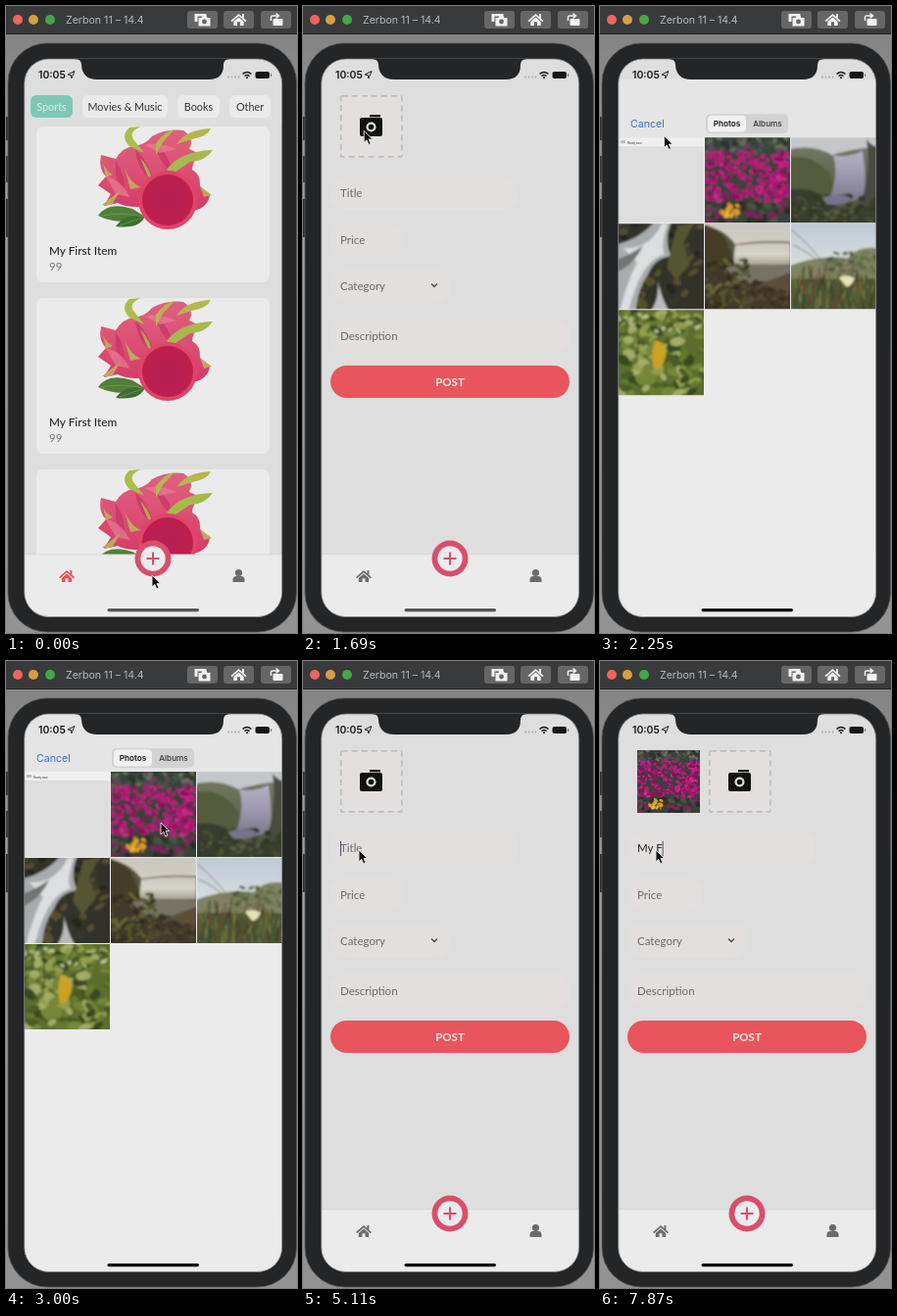
An HTML page that plays this animation: 297 by 640 pixels, repeating every 8000 ms.

```html
<!DOCTYPE html>
<html lang="en">
<head>
<meta charset="utf-8">
<title>Listing app demo</title>
<style>
  html, body { margin: 0; width: 100%; height: 100%; overflow: hidden; background: #999; }
  svg { display: block; }
  #stage { width: 100vw; height: 100vh; }
  text { font: 11.5px Lato, "Open Sans", sans-serif; white-space: pre; }
  .ui { font-family: Inter, Roboto, sans-serif; }
</style>
</head>
<body>
<svg id="stage" viewBox="0 0 297 640" preserveAspectRatio="none"></svg>
<script>
const LOOP = 8000;
const RED = '#e8555c', PANEL = '#ebebeb', GREY = '#6c6a6a';
const T = { form: 330, open: 1930, close: 3300, picked: 5480 };
const KEYS = [[7090, 'M'], [7310, 'My'], [7520, 'My '], [7740, 'My F']];
const POINTER = [
  [0, 149, 581], [500, 149, 581], [1620, 62, 127], [2000, 64, 132],
  [2200, 64, 132], [2900, 158, 165], [3330, 158, 165], [3470, 158, 166],
  [4160, 158, 166], [4980, 57, 193]
];

let seed = 7;
const rand = (a = 0, b = 1) => {
  seed = (seed * 16807) % 2147483647;
  return a + (b - a) * seed / 2147483647;
};
const rect = (x, y, w, h, fill, r = 0, extra = '') =>
  `<rect x="${x}" y="${y}" width="${w}" height="${h}" rx="${r}" fill="${fill}" ${extra}/>`;
const path = (d, fill, extra = '') => `<path d="${d}" fill="${fill}" ${extra}/>`;
const line = (d, color, width = 1, extra = '') =>
  path(d, 'none', `stroke="${color}" stroke-width="${width}" ${extra}`);
const circle = (x, y, r, fill, extra = '') =>
  `<circle cx="${x}" cy="${y}" r="${r}" fill="${fill}" ${extra}/>`;
const text = (x, y, s, fill, extra = '') => `<text x="${x}" y="${y}" fill="${fill}" ${extra}>${s}</text>`;
const at = (x, y, s, extra = '') => `<g transform="translate(${x} ${y})" ${extra}>${s}</g>`;
const gradient = (id, ...colors) =>
  `<linearGradient id="${id}" x2="0" y2="1">${colors.map((c, i) =>
    `<stop offset="${i / (colors.length - 1)}" stop-color="${c}"/>`).join('')}</linearGradient>`;

// Scatter small tilted ellipses over a region
function blobs(n, [x0, y0, x1, y1], size, colors) {
  let out = '';
  for (let i = 0; i < n; i++) {
    const x = rand(x0, x1), y = rand(y0, y1), r = rand(size * .5, size);
    const color = colors[Math.floor(rand(0, colors.length))];
    out += `<ellipse rx="${r.toFixed(1)}" ry="${(r * rand(.35, .8)).toFixed(1)}" fill="${color}" ` +
      `transform="translate(${x.toFixed(1)} ${y.toFixed(1)}) rotate(${rand(-60, 60).toFixed(0)})"/>`;
  }
  return out;
}

// Soft-focus scene on a backdrop that overscans the crop
const scene = (backdrop, ...parts) =>
  `<g filter="url(#soft)">${rect(-9, -9, 105, 105, backdrop)}${parts.join('')}</g>`;

const photos = [
  rect(0, 0, 87, 87, '#dedede') + rect(0, 0, 87, 9, '#f0f0f0') +
    rect(2, 3, 5, 3, '#bbb') + text(9, 6.5, 'Ready now', '#333', 'style="font-size:3px"'),

  scene('#37423a',
    blobs(45, [0, 0, 87, 16], 5, ['#455641', '#2b362e', '#64705a', '#69405f']),
    blobs(280, [-2, 15, 90, 66], 4, ['#c2187f', '#a51270', '#d0278c', '#7f1759', '#b41b78']),
    blobs(70, [0, 66, 87, 88], 5, ['#2c3728', '#48543f', '#7d235c', '#252d23']),
    blobs(16, [15, 69, 34, 82], 4, ['#dca023', '#ecb62e', '#cf8726'])),

  scene('#c4c6ca',
    path('M-5 13Q22 6 42 18Q60 12 92 9V95H-5Z', 'url(#hill)'),
    path('M43 18Q58 21 73 14Q77 39 75 60Q60 70 40 61Q49 37 43 18', 'url(#falls)'),
    path('M77 2Q85 12 92 8V92H65L75 53Q81 27 77 2', '#4a4c40'),
    path('M-5 22Q18 15 36 33Q46 40 39 62L-5 68Z', '#535c3e'),
    path('M-5 54Q22 48 41 66T92 56V95H-5Z', '#393d2d'),
    blobs(60, [0, 60, 87, 87], 4, ['#484e32', '#30372a', '#595c3d']),
    path('M32 62Q48 54 63 63Q51 71 37 68Z', '#77738a')),

  scene('#33332b',
    blobs(70, [0, 0, 87, 87], 7, ['#24251f', '#403f2c', '#56502f', '#323729']),
    path('M-5 22Q23 16 39-5H55Q45 18 54 33Q36 35 30 52Q19 66 17 95H-5Z', '#a9acae'),
    path('M5 25Q32 26 44 0H50Q42 24 47 31Q22 38 10 90H1Q10 55 19 40Z', '#dcdedf'),
    path('M25 22Q16 43-5 51V38Q14 31 25 22', '#727572'),
    path('M60 2L76 0L66 20L73 41L59 58L49 44Z', '#575430'),
    path('M40 58Q42 78 31 92H53Q43 75 40 58', '#b9babb')),

  scene('url(#evening)',
    path('M-5 2Q18 3 31 21Q60 16 92 19V95H-5Z', '#5c5443'),
    path('M31 22Q58 18 87 20V42H29Z', 'url(#falls5)'),
    path('M-5 0Q20 4 26 27L32 46L-5 61Z', '#443d27'),
    path('M20 45Q52 39 92 44V62Q52 58 28 64Z', '#767365'),
    path('M-5 56L19 43L38 62L92 57V95H-5Z', '#40382a'),
    blobs(90, [0, 36, 46, 86], 4, ['#535829', '#302c20', '#686634', '#443e27']),
    blobs(50, [38, 60, 87, 87], 5, ['#373025', '#544a35', '#453d29']),
    path('M55 62L92 48V70Z', '#5b4d39')),

  scene('url(#sky)',
    path('M-5 44Q30 31 58 35Q70 21 92 26V95H-5Z', '#7f8263'),
    blobs(44, [36, 30, 87, 49], 4, ['#616c48', '#757b56', '#505b3c']),
    rect(-5, 56, 97, 40, '#4b5435'),
    [...Array(120)].map(() => line(`M${rand(0, 87)} ${rand(56, 92)}l${rand(-4, 4)} ${-rand(6, 18)}`,
      ['#354325', '#65703a', '#6b4931', '#777e43'][Math.floor(rand(0, 4))], 1.3)).join(''),
    line('M0 6Q22 24 34 43M2 22Q18 29 28 39', '#6b7169', .9),
    path('M49 55Q57 51 65 56Q61 65 56 64Z', '#e5e1b8')),

  scene('#5d6d2d',
    blobs(160, [0, 0, 87, 87], 8, ['#758738', '#485d28', '#919f4b', '#374a22', '#a4ac68', '#66792f']),
    line('M18 0Q22 34 18 50M51 2L37 35', '#38412a', 1.2),
    path('M37 31Q49 32 48 48Q45 60 36 61Q32 45 37 31', '#cba225'),
    blobs(14, [0, 0, 87, 22], 4, ['#bdc59a', '#a8b578']))
];
const photo = (i, x, y, size) =>
  `<svg x="${x}" y="${y}" width="${size}" height="${size}" viewBox="0 0 87 87">${photos[i]}</svg>`;

const house = path('M0-6L8 1L6.8 2.2L0-3.7L-6.8 2.2L-8 1ZM3.5-6H5.4V-1L3.5-2.8ZM-5.2 2L0-2.5L5.2 2V6H1.5V2.2H-1.5V6H-5.2Z', 'currentColor');

const fruit =
  path('M97 29L112 33Q119 21 131 20Q143 18 149 10Q164 2 181 4Q193 12 187 23L198 28Q190 36 190 44Q199 49 198 61L208 70Q206 83 191 86L133 82Q121 82 114 78L100 81L107 69L94 60L102 51Q94 43 97 29', 'url(#peel)') +
  path('M112 35Q122 49 121 67Q110 59 112 35M132 23Q147 38 151 56Q135 48 132 23M153 18Q168 31 169 45Q156 38 153 18', '#cc3d67') +
  path('M102 51Q119 55 126 72L112 69ZM142 19Q155 15 174 23L157 27Z', '#e98298', 'opacity=".65"') +
  path('M126 20Q116 10 126 1L138 0Q125 5 130 13L141 27Z', '#aabd4c') +
  path('M153 17Q163 4 172 3L160 16L153 29ZM174 18Q184 3 209 2Q206 10 190 13Z', '#b4b64e') +
  path('M164 44Q178 25 211 24Q203 36 188 36L170 48Z', '#a7b84c') +
  path('M97 29Q98 43 109 49L102 52ZM120 39Q125 57 138 62L127 64ZM98 80L117 65L108 80ZM198 61L210 70L202 72Z', '#bfa75c') +
  path('M137 32Q148 43 151 61L144 49Z', '#b5a554') +
  path('M94 91Q104 76 129 84L142 92Q116 102 94 91', '#4f8038') +
  path('M112 102Q121 89 142 91Q137 105 112 102', '#3d6d31') +
  line('M97 91Q119 87 140 92M116 101L139 93', '#7a9d50', .7) +
  circle(165, 75, 30, '#e2436a') + circle(165, 75, 26, 'url(#flesh)');

const card = y => at(0, y,
  rect(31, 0, 238, 159, PANEL, 7) + fruit +
  text(44, 131, 'My First Item', '#272727', 'style="font-size:11.8px;font-weight:500"') +
  text(44, 147, '99', '#777'));

const chip = (x, w, label, fill = PANEL, color = '#333') =>
  rect(x, 91, w, 23, fill, 6) +
  text(x + w / 2, 106.5, label, color, 'text-anchor="middle" style="font-size:10.8px"');

const field = (y, w, label, id = '') =>
  rect(28, y, w, 34, '#e3dfde', 16) + text(38, y + 21, label, GREY, id);

const picker = x => at(x, 91,
  rect(.8, .8, 62, 62, '#e3dfde', 1, 'stroke="#bdbdbd" stroke-width="1.7" stroke-dasharray="6 4"') +
  path('M20 25Q20 23 22 23H30V20H41V23Q43 23 43 25V40Q43 42 41 42H22Q20 42 20 40Z', '#101210') +
  line('M30 22.6H42', '#d5d1d0', .8) + circle(31.5, 32.5, 5, '#e3dfde') + circle(31.5, 32.5, 2.8, '#101210'));

const barButton = (x, icon) => rect(x, 5, 31, 18, '#666667', 3) + at(x + 15.5, 14, icon, 'color="#f1f1f1"');

const windowBar =
  rect(0, 0, 297, 29, '#393a3b') + rect(0, 28, 297, 1, '#222') +
  circle(12, 14, 5, '#ed655d') + circle(28, 14, 5, '#d5a044') + circle(45, 14, 5, '#43a747') +
  text(61, 18, 'Zerbon 11 – 14.4', '#b9b9ba', 'class="ui" style="font-size:10.6px"') +
  barButton(185, path('M-8-6H4V-3.5H-5V2H-8Z', 'currentColor') +
    path('M-4-2H-1L0-4H4L5-2H8V6.5H-4Z', 'currentColor') + circle(2, 2, 2.4, '#666667')) +
  barButton(222, house) +
  barButton(260, rect(-3, -1, 10, 7, 'currentColor', 1) +
    line('M-5 1V-3Q-5-4 -3-4H2M0-6.5L3-4L0-1.5', 'currentColor', 1.5));

const feed = card(123) + card(298) + card(473) +
  rect(19, 54, 263, 69, '#dedede') +
  chip(25, 43, 'Sports', '#7ec7b5', '#d9eee8') + chip(78, 87, 'Movies &amp; Music') +
  chip(175, 43, 'Books') + chip(228, 42, 'Other');

const form =
  `<g id="chosen">${photo(1, 38, 91, 64)}</g><g id="picker">${picker(38)}</g>` +
  field(174, 191, 'Title', 'id="title"') + field(222, 76, 'Price') +
  field(269, 123, 'Category') + line('M131 283.5L134 286.5L137 283.5', '#444', 1.3) +
  field(320, 245, 'Description') +
  rect(28, 367, 244, 33, RED, 16.5) +
  text(150, 388, 'POST', '#f4e6e6', 'text-anchor="middle" style="font-weight:700"') +
  rect(0, 184, 1, 15, '#465079', 0, 'id="caret"');

const tabs = rect(19, 560, 263, 64, PANEL) + rect(19, 559.5, 263, .7, '#d2d2d2') +
  at(62, 582, house, 'id="home"') +
  circle(237.5, 578.5, 3.6, GREY) + path('M231.5 588V585Q232 582 235 582H240Q243 582 243.5 585V588Z', GREY) +
  circle(150, 564, 18.5, '#d94e6a') + circle(150, 564, 12.7, PANEL) +
  line('M143.5 564H156.5M150 557.5V570.5', '#d94e6a', 2);

const sheet = rect(19, 54, 263, 640, PANEL) + rect(19, 54, 263, 59, '#e5e5e5') +
  text(31, 103, 'Cancel', '#3674c4', 'class="ui" style="font-size:10.6px"') +
  rect(108, 89, 84, 20, '#d2d2d3', 5) + rect(110, 90.5, 39, 17, '#f1f1f1', 4) +
  text(129.5, 102, 'Photos', '#171717', 'class="ui" text-anchor="middle" style="font-size:8.2px;font-weight:600"') +
  text(171, 102, 'Albums', '#333', 'class="ui" text-anchor="middle" style="font-size:8.2px;font-weight:500"') +
  photos.map((_, i) => photo(i, 19 + 88 * (i % 3), 113 + 88 * Math.floor(i / 3), 87)).join('');

const status =
  path('M70 54Q77 54 77 60Q78 75 93 75H207Q222 75 222 60Q222 54 229 54Z', '#242526') +
  text(33, 74, '10:05', '#161616', 'class="ui" style="font-size:10.4px;font-weight:600"') +
  path('M70 66.5L66.8 74L66.3 70.6L63 70Z', 'none', 'stroke="#222" stroke-width="1"') +
  [227, 230.5, 234, 237.5].map(x => circle(x, 72.5, .9, '#aaa')).join('') +
  line('M241.5 69.5Q246 65.5 250.5 69.5M243.5 71.6Q246 69.5 248.5 71.6', '#161616', 1.5) + circle(246, 73.2, 1, '#161616') +
  rect(254.5, 67, 14.5, 7, '#161616', 2) + rect(270, 69, 1.2, 3, '#777', .6);

const stage = document.getElementById('stage');
stage.innerHTML = `
  <defs>
    <clipPath id="screen">${rect(18.7, 54, 263, 569.5, '#000', 25)}</clipPath>
    <filter id="soft"><feGaussianBlur stdDeviation=".9"/></filter>
    <radialGradient id="flesh"><stop stop-color="#b51f53"/><stop offset="1" stop-color="#bd1f4e"/></radialGradient>
    ${gradient('desk', '#848484', '#a2a2a2', '#999', '#929292')}
    ${gradient('peel', '#e0607f', '#dc5075', '#d23c68')}
    ${gradient('hill', '#747860', '#596149', '#414733')}
    ${gradient('falls', '#b5b2c3', '#9c97ad', '#7b778c')}
    ${gradient('falls5', '#c9c6bc', '#d9d6cc', '#a6a294')}
    ${gradient('evening', '#c5c5c3', '#ddd3bd', '#81765f')}
    ${gradient('sky', '#b9c6d4', '#d8dddf', '#b8b8a8')}
  </defs>
  ${rect(0, 29, 297, 611, 'url(#desk)')}
  ${rect(0, 113, 4, 24, '#333') + rect(0, 153, 4, 27, '#383838') + rect(0, 197, 4, 39, '#303030')}
  ${windowBar}
  ${rect(2, 38, 294.5, 601, '#242526', 40, 'stroke="#555" stroke-width=".8"')}
  <g clip-path="url(#screen)">
    ${rect(18, 54, 264, 570, '#dedede')}
    <g id="feed">${feed}</g><g id="form">${form}</g>
    ${tabs}<g id="sheet">${sheet}</g>
  </g>
  ${rect(18.7, 54, 263, 569.5, 'none', 25, 'stroke="#777" stroke-width=".8"')}
  ${status}
  ${rect(103.5, 615, 93.5, 3.2, '#111', 1.6, 'id="indicator"')}
  <g id="pointer">${path('M0 0V12L2.8 9.4L4.8 14L7 13L5 8.6H8.8Z', '#111', 'stroke="#e8e8e8" stroke-width=".9"')}</g>`;

const el = Object.fromEntries([...stage.querySelectorAll('[id]')].map(n => [n.id, n]));
const show = (node, on) => node.setAttribute('visibility', on ? 'visible' : 'hidden');
const move = (node, x, y) => node.setAttribute('transform', `translate(${x} ${y})`);

// Critically damped spring from 0 to 1
const settle = (ms, rate) => {
  const s = Math.max(0, ms) * rate / 1000;
  return 1 - (1 + s) * Math.exp(-s);
};

function pointerAt(t) {
  const next = POINTER.findIndex(p => p[0] > t);
  if (next < 0) return POINTER[POINTER.length - 1].slice(1);
  const [t0, x0, y0] = POINTER[next - 1], [t1, x1, y1] = POINTER[next];
  const u = (t - t0) / (t1 - t0), e = u * u * (3 - 2 * u);
  return [x0 + (x1 - x0) * e, y0 + (y1 - y0) * e];
}

function render(t) {
  const inForm = t >= T.form, picked = t >= T.picked;
  show(el.feed, !inForm);
  show(el.form, inForm);
  el.home.setAttribute('color', inForm ? GREY : RED);

  const sheetUp = t < T.close ? settle(t - T.open, 16) : 1 - settle(t - T.close, 23);
  show(el.sheet, sheetUp > .001);
  move(el.sheet, 0, 586 * (1 - sheetUp));
  el.indicator.setAttribute('fill', t < T.open ? '#555' : '#0c0c0c');

  show(el.chosen, inForm && picked);
  move(el.picker, picked ? 73 : 0, 0);

  const typed = KEYS.reduce((s, [when, value]) => t >= when ? value : s, '');
  el.title.textContent = typed || 'Title';
  el.title.setAttribute('fill', typed ? '#222' : GREY);
  el.caret.setAttribute('x', 38 + (typed ? el.title.getComputedTextLength() : 0));
  show(el.caret, t >= 5050 && (typed || (t - 5050) % 1000 < 550));

  move(el.pointer, ...pointerAt(t));
}

const start = performance.now();
function tick() {
  render((performance.now() - start) % LOOP);
  requestAnimationFrame(tick);
}
tick();
</script>
</body>
</html>
```
